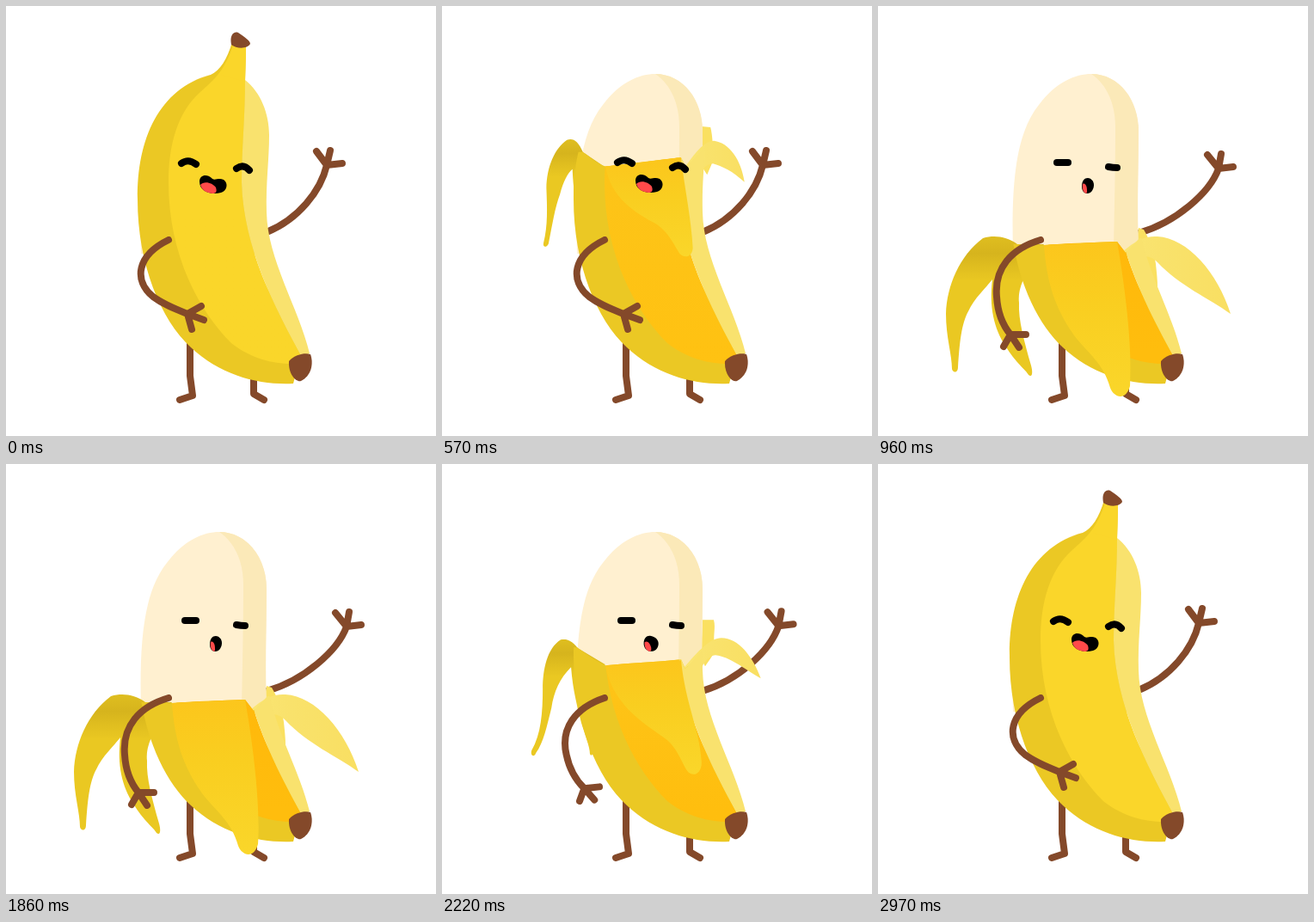
Write an HTML page that moves like this. It is 500 by 500 pixels and loops after 3 s.

```html
<!DOCTYPE html>
<html lang="en">
<head>
<meta charset="utf-8">
<title>Peeling banana</title>
<style>
html, body { margin: 0; width: 100%; height: 100%; overflow: hidden; background: #fff; }
svg { display: block; width: 100%; height: 100%; }
.limb { fill: none; stroke: #84492a; stroke-width: 8; stroke-linecap: round; stroke-linejoin: round; }
.eye { fill: none; stroke: #000; stroke-width: 8; stroke-linecap: round; }
.cap { fill: #84492a; }
.anim { animation: 3s linear infinite; }
#peelEdge { animation-name: peelEdge; }
#leftFlap { animation-name: leftFlap; }
#rightFlap { animation-name: rightFlap; }
#backFlap { animation-name: backFlap; }
#frontFlap { animation-name: frontFlap; }
#stem { animation-name: stem; }
#stemCap { animation-name: stemCap; }
#frontTop { animation-name: frontTop; }
#frontBottom { animation-name: frontBottom; }
#rightArm { animation-name: rightArm; }
#leftArm { animation-name: leftArm; }
#face { animation-name: face; }
#leftEye { animation-name: leftEye; }
#rightEye { animation-name: rightEye; }
#mouth { animation-name: mouth; }
#tongue { animation-name: tongue; }

/* Peel: closed, slit, parted, rising, peeled, open, falling back */
@keyframes peelEdge {
  0%, 97%, 100% { d: path("M100 500L100 20L255 20C258 20 260 20 262 20C264 20 268 20 272 20L280 20L300 20L400 20L400 500Z"); animation-timing-function: ease-in; }
  11%, 82% { d: path("M100 500L100 75L237 80C225 95 212 110 205 125C215 105 235 84 266 82L275 79L284 76L400 76L400 500Z"); animation-timing-function: ease-out; }
  14%, 79.5% { d: path("M100 500L100 92L225 93C215 105 205 125 200 148C204 120 250 113 282 103L290 101L297 100L400 100L400 500Z"); }
  18%, 77% { d: path("M100 500L100 150L165 150C172 155 180 165 190 168C215 165 250 160 278 156L283 166L304 146L400 146L400 500Z"); }
  23% { d: path("M100 500L100 245L157 246C168 248 180 256 191 258C220 257 250 255 277 253L285 267L304 248L400 248L400 500Z"); animation-timing-function: ease-out; }
  32%, 62% { d: path("M100 500L100 277L160 277C170 277 182 277 193 278C220 276 250 275 278 274L288 287L304 270L400 270L400 500Z"); animation-timing-function: ease-in; }
  74% { d: path("M100 500L100 213L157 214C166 220 178 229 190 235C220 232 250 231 278 228L283 239L303 217L400 217L400 500Z"); }
}
@keyframes leftFlap {
  0%, 14%, 79.5%, 100% { d: path("M200 120C197 116 194 116 190 121C183 130 174 143 170 157C167 170 166 180 165 190C165 193 167 193 168 190C170 180 174 170 178 160C180 150 184 142 188 135C184 150 180 165 178 175C176 185 175 190 175 195C176 198 178 198 179 195C182 180 184 170 186 160C188 150 194 140 200 130Z"); }
  18%, 77% { d: path("M165 150C160 135 155 131 148 134C135 145 128 165 128 190C128 210 128 230 124 250C123 254 127 254 129 250C133 230 138 210 143 195C146 180 150 170 156 165C158 185 160 200 162 215C165 230 168 245 169 255C170 258 172 257 173 252C174 235 172 220 171 205C170 190 174 175 188 168Z"); }
  23% { d: path("M160 247C152 240 142 238 135 239C115 244 98 272 96 295C100 330 105 350 95 375C94 385 102 385 104 378C110 350 105 330 115 310C122 297 130 290 135 285C132 320 138 350 150 375C165 395 174 405 172 415C175 423 180 421 179 412C180 390 170 365 165 340C161 320 163 300 190 258Z"); animation-timing-function: ease-out; }
  32%, 62% { d: path("M162 277C150 268 135 266 122 270C95 290 80 325 79 358C79 385 86 405 86 422C87 427 93 427 93 420C95 390 97 370 105 355C112 340 125 328 133 318C129 350 135 375 148 395C160 415 172 423 175 429C180 433 180 425 178 418C170 390 163 365 164 345C163 330 166 318 193 277Z"); animation-timing-function: ease-in; }
  74% { d: path("M158 215C150 205 145 204 138 205C122 215 117 240 117 262C117 290 115 315 104 334C102 340 107 343 109 337C118 325 122 305 127 285C130 265 137 250 150 237C152 265 158 285 162 302C167 318 172 330 172 338C174 342 176 338 177 330C178 310 172 290 170 270C168 255 172 245 190 234Z"); }
}
@keyframes rightFlap {
  0%, 14%, 79.5%, 100% { d: path("M284 130C287 122 290 117 293 118C297 125 299 140 299 155C296 150 294 145 292 142C290 142 289 143 287 145Z"); }
  18%, 77% { d: path("M284 165C295 148 305 135 314 135C328 138 338 155 341 178C330 165 320 160 312 160C308 162 305 165 298 175Z"); }
  23% { d: path("M282 265C300 245 312 240 325 240C358 240 386 270 393 308C370 295 345 285 327 272C318 265 305 268 296 276Z"); animation-timing-function: ease-out; }
  32%, 62% { d: path("M284 286C300 272 312 267 325 268C360 270 395 310 410 358C385 340 350 325 325 298C315 288 305 290 297 296Z"); animation-timing-function: ease-in; }
  74% { d: path("M281 238C298 218 312 203 325 203C345 203 362 225 371 250C350 238 335 225 318 223C310 224 305 230 300 242Z"); }
}
@keyframes backFlap {
  0%, 14%, 79.5%, 100% { d: path("M288 115L294 117C296 125 298 135 299 145C299 150 299 155 299 160L290 150Z"); }
  18%, 77% { d: path("M302 118L312 119C314 128 312 140 314 150C313 156 309 162 306 168L300 160Z"); }
  23% { d: path("M301 224L313 226C318 240 325 255 324 272C322 285 318 295 317 305L298 270Z"); animation-timing-function: ease-out; }
  32%, 62% { d: path("M303 258L309 260C316 272 321 285 323 300C324 310 325 318 325 328L298 288Z"); animation-timing-function: ease-in; }
  74% { d: path("M303 182L316 182C319 192 314 202 318 214C318 220 310 230 306 236L301 226Z"); }
}
@keyframes frontFlap {
  0%, 14%, 79.5%, 100% { opacity: 0; d: path("M200 148C212 130 240 118 250 114C260 112 265 111 270 110C275 110 278 109 280 109C282 108 286 107 290 106Z"); }
  18%, 77% { opacity: 1; d: path("M190 168C195 200 225 215 250 225C265 235 270 250 276 258C282 263 290 260 290 250C288 220 282 190 278 156Z"); }
  23% { opacity: 1; d: path("M191 258C200 310 222 340 250 365C265 380 275 395 278 403C284 412 294 414 298 402C298 360 285 310 277 253Z"); animation-timing-function: ease-out; }
  32%, 62% { opacity: 1; d: path("M193 278C196 320 205 350 228 383C245 405 262 415 270 444C274 455 288 460 293 442C296 400 288 330 278 274Z"); animation-timing-function: ease-in; }
  74% { opacity: 1; d: path("M190 236C200 285 240 305 262 322C275 333 280 352 287 360C294 365 302 360 302 348C300 310 283 280 278 229Z"); }
}
@keyframes stem {
  0%, 97%, 100% { opacity: 1; d: path("M265 46C261 62 257 72 250 80L278 88C278 75 279 60 279 46Z"); animation-timing-function: ease-in; }
  11%, 82% { opacity: 1; d: path("M263 53C257 65 250 73 244 79C258 77 272 80 281 85C279 75 280 65 280 54Z"); animation-timing-function: ease-out; }
  14%, 79.5% { opacity: 1; d: path("M251 79C263 68 275 68 285 61C281 68 279 78 280 87C274 82 262 79 251 79Z"); }
  16%, 78.5% { opacity: 1; d: path("M254 82C264 76 272 76 279 74C278 78 278 82 277 86C270 83 262 82 254 82Z"); }
  16.01%, 78.49% { opacity: 0; d: path("M254 82C264 76 272 76 279 74C278 78 278 82 277 86C270 83 262 82 254 82Z"); }
}
@keyframes stemCap {
  0%, 97%, 100% { opacity: 1; transform: none; animation-timing-function: ease-in; }
  11%, 82% { opacity: 1; transform: translateY(7.5px); animation-timing-function: ease-out; }
  14%, 79.5% { opacity: 1; transform: translateY(12px); }
  16%, 78.5% { opacity: 1; transform: translateY(19px); }
  16.01%, 78.49% { opacity: 0; transform: translateY(19px); }
}
@keyframes frontTop {
  0%, 14%, 79.5%, 97%, 100% { stop-color: #fad62a; }
  23%, 32%, 62% { stop-color: #ffb60a; }
  74% { stop-color: #fdc61b; }
}
@keyframes frontBottom {
  0%, 97%, 100% { stop-color: #fad62a; }
  14%, 82% { stop-color: #ffc818; }
  23%, 32%, 62% { stop-color: #ffbd0d; }
  74% { stop-color: #ffbe0e; }
}

/* Arms and face: cheerful, then relaxed */
@keyframes rightArm {
  0%, 23%, 83%, 100% { d: path("M303 263C340 248 366 215 373 185M361 169L373 185L377 168M373 185L391 183"); animation-timing-function: ease-in-out; }
  32%, 70% { d: path("M303 264C346 252 386 217 396 189M383 173L396 189L399 172M396 189L413 187"); animation-timing-function: ease-in-out; }
}
@keyframes leftArm {
  0%, 23%, 83%, 100% { d: path("M189 272C152 290 148 319 171 338C183 347 196 352 211 358M227 349L211 358L230 365M211 358L216 376"); animation-timing-function: ease-in-out; }
  32%, 70% { d: path("M189 272C155 282 135 305 138 338C139 355 145 371 154 382M172 382L154 382L164 397M154 382L146 396"); animation-timing-function: ease-in-out; }
}
@keyframes face {
  0%, 23%, 100% { transform: none; animation-timing-function: ease-in-out; }
  14% { transform: translateY(-2.5px); animation-timing-function: ease-in-out; }
}
@keyframes leftEye {
  0%, 23%, 83%, 100% { d: path("M204 183Q212 177 221 184"); animation-timing-function: ease-in-out; }
  32%, 74% { d: path("M208 182Q214 182 221 182"); animation-timing-function: ease-in-out; }
}
@keyframes rightEye {
  0%, 23%, 83%, 100% { d: path("M268 189Q276 183 283 191"); animation-timing-function: ease-in-out; }
  32%, 74% { d: path("M268 187Q273 188 278 188"); animation-timing-function: ease-in-out; }
}
@keyframes mouth {
  0%, 23%, 83%, 100% { d: path("M225 204C225 196 234 195 239 200C242 204 247 199 253 202C259 206 257 215 250 217C238 220 225 216 225 204Z"); animation-timing-function: ease-in-out; }
  32%, 70% { d: path("M237 210C237 203 240 200 244 200C247 200 251 203 251 208C251 213 248 218 243 218C239 218 237 214 237 210Z"); animation-timing-function: ease-in-out; }
}
@keyframes tongue {
  0%, 23%, 83%, 100% { d: path("M226 208C230 203 240 205 244 211C246 217 243 218 240 218C232 217 228 214 226 208Z"); animation-timing-function: ease-in-out; }
  32%, 70% { d: path("M238 207C241 205 243 210 243 214C243 217 243 217 242 218C239 217 237 213 238 207Z"); animation-timing-function: ease-in-out; }
}
</style>
</head>
<body>
<svg viewBox="0 0 500 500">
  <defs>
    <clipPath id="peelClip"><path id="peelEdge" class="anim" d="M100 20H400V500H100Z"/></clipPath>
    <linearGradient id="frontFill" gradientUnits="userSpaceOnUse" x1="0" y1="200" x2="0" y2="400">
      <stop id="frontTop" class="anim" stop-color="#fad62a"/>
      <stop id="frontBottom" class="anim" offset="1" stop-color="#fad62a"/>
    </linearGradient>
    <linearGradient id="frontFlapFill" x1="0" y1="0" x2="0" y2="1">
      <stop stop-color="#fcc61c"/>
      <stop offset=".4" stop-color="#f9ce20"/>
      <stop offset="1" stop-color="#fad62a"/>
    </linearGradient>
    <linearGradient id="leftFlapFill" x1="0" y1="0" x2="0" y2="1">
      <stop stop-color="#dfbe20"/>
      <stop offset=".12" stop-color="#d6b41d"/>
      <stop offset=".32" stop-color="#eac822"/>
    </linearGradient>
    <linearGradient id="rightFlapFill">
      <stop stop-color="#fae574"/>
      <stop offset=".35" stop-color="#f9e26c"/>
      <stop offset="1" stop-color="#f9df62"/>
    </linearGradient>
  </defs>

  <path class="limb" d="M214 390V430L217 453L202 458M288 428V451L300 458"/>
  <path id="rightArm" class="limb anim"/>
  <path id="backFlap" class="anim" fill="#fae060"/>

  <path fill="#fff0d0" d="M157 288C155 210 159 150 187 115C207 88 230 79 248 79C281 79 303 110 303 145C303 190 301 230 303 288Z"/>
  <path fill="#fbe9b8" d="M248 79C281 79 303 110 303 145C303 190 301 230 303 288H274C275 230 276 190 276 140C276 115 267 92 248 79Z"/>

  <path id="leftFlap" class="anim" fill="url(#leftFlapFill)"/>
  <path id="rightFlap" class="anim" fill="url(#rightFlapFill)"/>

  <g clip-path="url(#peelClip)">
    <path fill="#ebc824" d="M263 42C257 62 249 75 238 80C178 96 152 155 153 225C153 300 180 365 215 397C250 430 295 441 334 439L343 406L290 300L278 88L279 44Z"/>
    <path fill="url(#frontFill)" d="M264 46C254 75 243 85 226 100C200 123 189 160 189 205C189 290 225 355 262 392C285 410 310 416 332 416L344 408C312 350 276 280 274 205C274 165 278 130 278 88L279 46Z"/>
    <path fill="#f9e26e" d="M278 86C296 100 306 125 306 150C306 180 302 205 303 240C304 295 340 350 353 404L344 408C312 350 276 280 274 205C274 165 278 130 278 86Z"/>
  </g>
  <path id="frontFlap" class="anim" fill="url(#frontFlapFill)"/>
  <path class="cap" d="M329 413C336 405 348 403 354 405C358 416 355 430 343 436C338 438 328 429 329 413Z"/>
  <path id="stem" class="anim" fill="#fad62a"/>
  <path id="stemCap" class="cap anim" d="M262 45C260 35 264 29 270 31C277 36 284 40 284 44C281 50 268 50 262 45Z"/>

  <g id="face" class="anim">
    <path id="leftEye" class="eye anim"/>
    <path id="rightEye" class="eye anim"/>
    <path id="mouth" class="anim"/>
    <path id="tongue" class="anim" fill="#ff4a4a"/>
  </g>
  <path id="leftArm" class="limb anim"/>
</svg>
</body>
</html>
```
